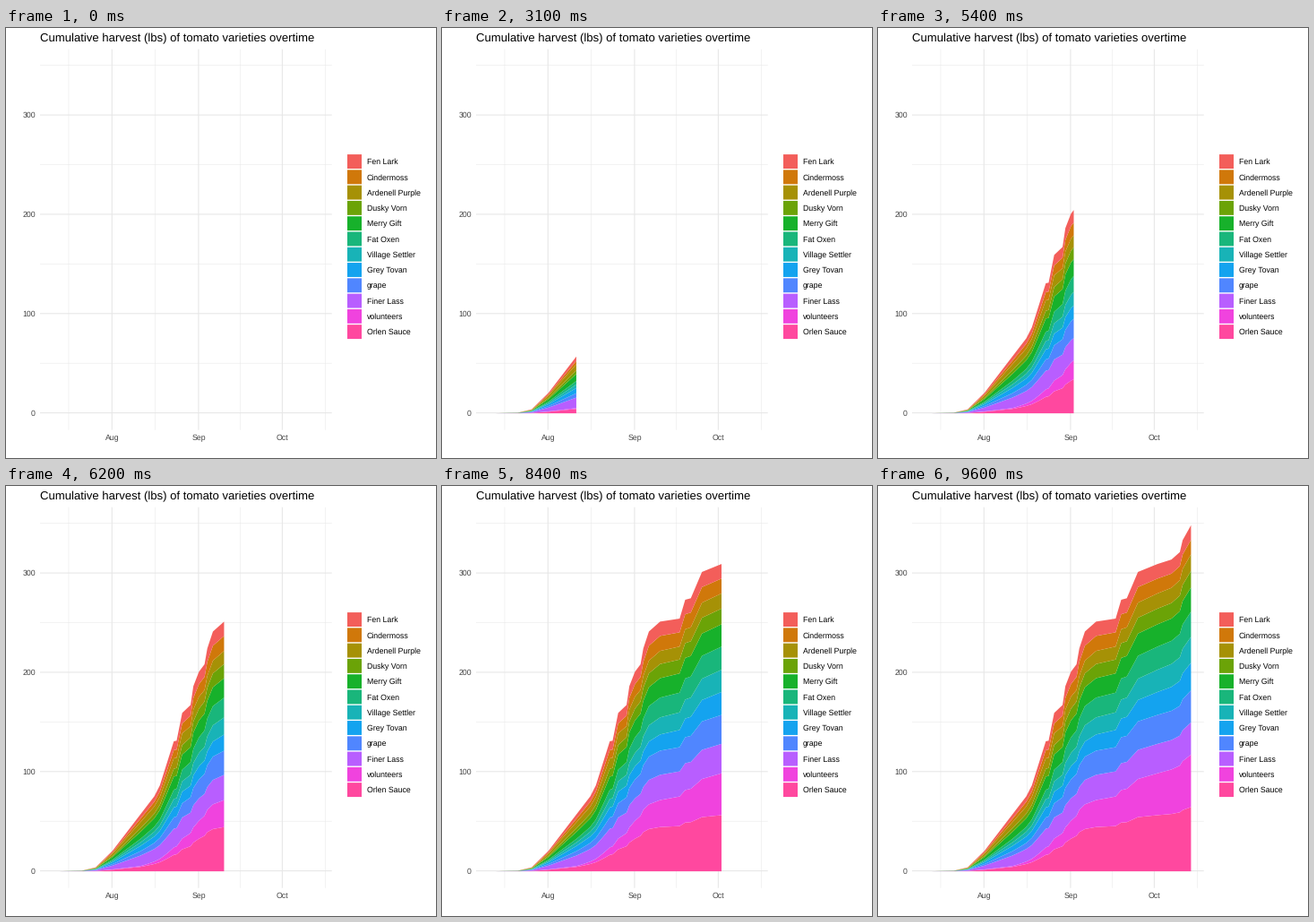
Animation, 480 px wide and 480 px high, one loop 10 s. Source, as a matplotlib script:

```python
import numpy as np
import matplotlib.pyplot as plt
from matplotlib.animation import FuncAnimation
from matplotlib.patches import Rectangle

plt.rcParams.update({"font.family": "Liberation Sans", "text.hinting": "none"})

SIZE, DPI = 480, 72
LEFT, RIGHT, TOP, BOTTOM = 38.0, 363.7, 23.7, 448.7
GRID, LABEL = "#E7E7E7", "#444444"
FIRST_DAY, LAST_DAY = 2, 95
KEY_PITCH, KEY_SIZE = 17.28, 15.9

# Name, colour and percentage of the harvest on each of MIX_DAYS, top band first.
MIX_DAYS = (31, 55, LAST_DAY)
VARIETIES = [
    ("Fen Lark", "#F35E5A", (7.7, 6, 4.2)),
    ("Cindermoss", "#D0780A", (6.2, 6.3, 4.2)),
    ("Ardenell Purple", "#A69106", (10.8, 5.3, 4.8)),
    ("Dusky Vorn", "#6BA307", (6.2, 5.8, 4.8)),
    ("Merry Gift", "#17B12B", (12.3, 7.9, 7)),
    ("Fat Oxen", "#19B67B", (6.2, 8, 7.3)),
    ("Village Settler", "#18B3B7", (6.2, 6.7, 7.5)),
    ("Grey Tovan", "#14A3EF", (9.2, 6.2, 8)),
    ("grape", "#5086FF", (7.7, 9.7, 9.3)),
    ("Finer Lass", "#B85EFF", (18.5, 10.2, 9.3)),
    ("volunteers", "#F043DE", (1.5, 10, 15.2)),
    ("Orlen Sauce", "#FF489F", (7.7, 17.5, 18.6)),
]

# Turning points of the total: (days since the first harvest, pounds).
TOTAL = [
    (FIRST_DAY, 0), (10, .6), (15, 4), (21, 20.5), (36, 75.5), (38, 86.5),
    (43, 131), (44, 131.5), (46, 159.5), (49, 167.5), (50, 186.5), (52, 201),
    (54, 208.5), (55, 224.5), (57, 241.5), (61, 251.5), (68, 254.5),
    (70, 273.5), (72, 275), (76, 301.5), (83, 309.5), (88, 314),
    (91, 321.5), (92, 333.5), (LAST_DAY, 348.6),
]


def x_of(day):
    return 52.8 + 3.117 * day


def y_of(pounds):
    return 429.6 - 1.1083 * pounds


def stack_edges(days):
    """Cumulative pounds at every band boundary, from zero upwards."""
    shares = np.array([np.interp(days, MIX_DAYS, mix)
                       for _, _, mix in reversed(VARIETIES)])
    bands = np.interp(days, *zip(*TOTAL)) * shares / shares.sum(axis=0)
    return np.vstack([np.zeros_like(days), np.cumsum(bands, axis=0)])


fig = plt.figure(figsize=(SIZE / DPI, SIZE / DPI), dpi=DPI, facecolor="white")
ax = fig.add_axes([0, 0, 1, 1])
ax.set(xlim=(0, SIZE), ylim=(SIZE, 0))
ax.axis("off")


def grid_line(xs, ys, width):
    ax.plot(xs, ys, color=GRID, lw=width, snap=False, zorder=1,
            solid_capstyle="butt")


def write(x, y, text, size=8.8, color="black", ha="left"):
    ax.text(x, y, text, size=size, color=color, ha=ha, va="baseline")


for pounds in range(0, 351, 50):
    y = y_of(pounds)
    major = pounds % 100 == 0
    grid_line((LEFT, RIGHT), (y, y), 1.07 if major else .53)
    if major:
        write(33, y + 3.2, str(pounds), color=LABEL, ha="right")

for day in (5.5, 36.5, 67, 97.5):
    grid_line((x_of(day),) * 2, (TOP, BOTTOM), .53)
for day, month in ((21, "Aug"), (52, "Sep"), (82, "Oct")):
    grid_line((x_of(day),) * 2, (TOP, BOTTOM), 1.07)
    write(x_of(day) + .4, 460, month, color=LABEL, ha="center")

write(38, 15, "Cumulative harvest (lbs) of tomato varieties overtime", size=13.16)

for row, (name, color, _) in enumerate(VARIETIES):
    middle = 149.05 + KEY_PITCH * row
    ax.add_patch(Rectangle((381, middle - KEY_SIZE / 2), 16, KEY_SIZE,
                           fc=color, lw=0, snap=False))
    write(403, middle + 3.2, name)

areas = []


def draw(frame):
    while areas:
        areas.pop().remove()
    # One day per frame, with two half-day steps around the middle.
    now = min(frame - np.clip((frame - 47) / 2, 0, 1), LAST_DAY)
    if now <= FIRST_DAY:
        return areas
    days = np.append(np.arange(FIRST_DAY, np.ceil(now)), now)
    edges = y_of(stack_edges(days))
    for low, high, (_, color, _) in zip(edges, edges[1:], reversed(VARIETIES)):
        areas.append(ax.fill_between(x_of(days), low, high, color=color,
                                     lw=0, zorder=2))
    return areas


anim = FuncAnimation(fig, draw, frames=100, interval=100, repeat=True,
                     repeat_delay=0, blit=False)
plt.show()
```
